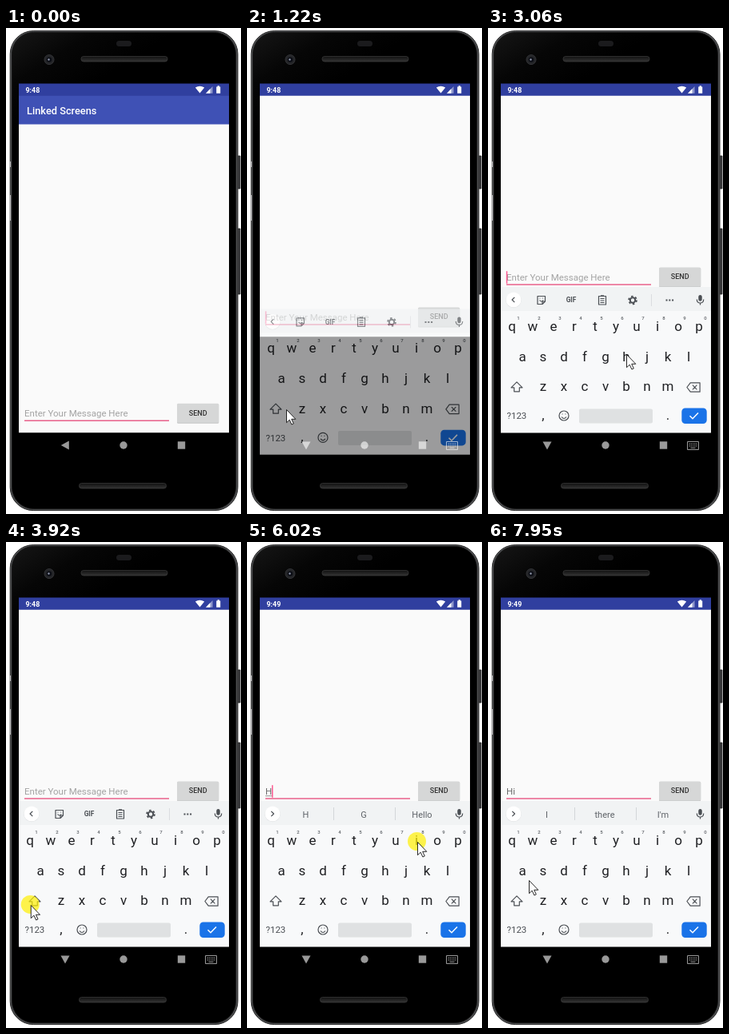
Write an HTML page that moves like this. It is 294 by 608 pixels and loops after 8000 ms.

```html
<!DOCTYPE html>
<html lang="en">
<head>
<meta charset="utf-8">
<title>Message entry on a phone</title>
<style>
  html, body { margin: 0; width: 100%; height: 100%; overflow: hidden; background: #fff; }
  svg { display: block; width: 100vw; height: 100vh; }
  text { font-family: Roboto, sans-serif; white-space: pre; }
  .mid { text-anchor: middle; }
  .key { font-size: 17px; fill: #202124; }
  .digit { font-size: 6px; font-weight: 500; fill: #5f6368; }
  .word { font-size: 11px; fill: #5f6368; }
  .line { fill: none; stroke: #4b4f54; stroke-width: 1.2; stroke-linejoin: round; }
  .solid { fill: #4b4f54; }
  .nav { fill: #fff; opacity: .6; }
</style>
</head>
<body>
<svg viewBox="0 0 294 608">
  <defs>
    <linearGradient id="shell" x1="0" y1="0" x2=".3" y2="1">
      <stop offset="0" stop-color="#161616"/><stop offset=".1" stop-color="#060606"/>
      <stop offset=".2" stop-color="#000"/><stop offset="1" stop-color="#000"/>
    </linearGradient>
    <linearGradient id="slot" x1="0" y1="0" x2="0" y2="1">
      <stop offset="0" stop-color="#111"/><stop offset="1" stop-color="#333"/>
    </linearGradient>
    <clipPath id="window"><path d="M16 84h263v422.400h-263z"/></clipPath>
    <clipPath id="screen"><path d="M16 84h263v451h-263z"/></clipPath>
  </defs>

  <g id="phone">
    <path d="M289 160h4v41h-4zM289 251h4v82h-4z" fill="#3c3d3f" stroke="#222" stroke-width=".8"/>
    <rect x="5.200" y="3.600" width="284.800" height="600" rx="29" fill="#4c4d4f" stroke="#2a2a2a"/>
    <rect x="7.500" y="5.500" width="280" height="596" rx="27" fill="url(#shell)" stroke="#161616"/>
    <path d="M4 167h2v7h-2zM4 209h2v32h-2z" fill="#bbb"/>
    <rect x="138" y="16" width="19" height="7" rx="3.500" fill="#1b1b1d"/>
    <circle cx="54" cy="39.600" r="6" fill="#242528" stroke="#333437"/>
    <circle cx="54" cy="39.600" r="3.200" fill="#0b0d14"/>
    <circle cx="53.500" cy="39.500" r="1.200" fill="#8f96aa"/>
    <rect x="94" y="35.500" width="108" height="6.500" rx="3" fill="url(#slot)" stroke="#383838" stroke-width=".8"/>
    <rect x="91.500" y="569.500" width="109" height="6.500" rx="3" fill="url(#slot)" stroke="#383838" stroke-width=".8"/>
    <path d="M16 69.400h263v465.600h-263z" fill="#000"/>
  </g>

  <g clip-path="url(#window)">
    <g id="content">
      <path d="M16 84h263v422.400h-263z" fill="#fafafa"/>
      <path d="M16 84h263v36.600h-263z" fill="#3f51b5"/>
      <text x="26" y="107.500" font-size="12.800" font-weight="500" fill="#fff">Linked Screens</text>
      <text id="hint" x="23" y="486" font-size="11.500" fill="#a3a3a3">Enter Your Message Here</text>
      <text id="typed" x="23" y="486" font-size="11.500" fill="#6b6b6b"></text>
      <path id="composing" stroke="#777" stroke-width=".8"/>
      <path d="M23 491.300h181" stroke="#e8608a" stroke-width="1.500"/>
      <rect id="caret" y="474.500" width="1.500" height="15.500" fill="#ff4081" opacity=".85"/>
      <rect x="214" y="470.300" width="52.200" height="24.500" rx="1.500" fill="#c4c5c5"/>
      <rect x="214" y="469.800" width="52.200" height="24" rx="1.500" fill="#d6d7d7"/>
      <text class="mid" x="240.200" y="484.700" font-size="9" font-weight="500" fill="#333">SEND</text>
    </g>
  </g>

  <path d="M16 69.400h263v15.350h-263z" fill="#303f9f"/>
  <text id="clock" x="24.500" y="80.500" font-size="8.900" font-weight="700" fill="#fff">9:48</text>
  <path d="M236.800 74.600q5.700-3.600 11.400 0l-5.700 7zM263.200 73.500h1.400v-1.300h2.200v1.300h1.400v8.300h-5z" fill="#fff"/>
  <path d="M250 81.800l8.500-8.800v8.800z" fill="#8f98cc"/>
  <path d="M250 81.800l5.500-5.700v5.700z" fill="#fff"/>

  <g clip-path="url(#screen)">
    <g id="keyboard">
      <path d="M16 324h263v31h-263z" fill="#f1f3f4"/>
      <path d="M16 354h263v152.400h-263z" fill="#f8f9fa"/>
      <circle cx="32" cy="340.500" r="9.700" fill="#dcdee0"/>
      <circle cx="32" cy="340" r="9.500" fill="#fff"/>
      <path id="chevron" class="line"/>
      <g id="tools">
        <path class="line" d="M62 335.500h9.500v6.500l-3.500 3.500h-6zM71.500 342h-3.500v3.500M64.500 340.500q2.300 3 4.600 0M64.500 338h.8M68.200 338h.8"/>
        <text class="mid solid" x="104" y="343.200" font-size="8.300" font-weight="700">GIF</text>
        <path class="line" d="M138.500 335.500h9v10.500h-9zM141 334.800h4M140.500 338.500h5M140.500 341h5M140.500 343.500h5"/>
        <circle class="line" cx="181" cy="340.500" r="3.200" style="stroke-width:2"/>
        <circle class="line" cx="181" cy="340.500" r="4.900" stroke-dasharray="2.500 2.630" style="stroke-width:1.800"/>
        <path d="M204.500 333v15" stroke="#dadce0"/>
        <path class="solid" d="M222.500 339.500h2v2h-2zM226.300 339.500h2v2h-2zM230.100 339.500h2v2h-2z"/>
      </g>
      <g id="suggestions">
        <path d="M108.500 332v16M185.500 332v16" stroke="#d3d6d9"/>
        <text class="word mid" x="73.500" y="344.500"></text>
        <text class="word mid" x="146" y="344.500"></text>
        <text class="word mid" x="219" y="344.500"></text>
      </g>
      <rect class="solid" x="263.300" y="334" width="4.400" height="7.800" rx="2.200"/>
      <path class="line" d="M261.300 339.500q0 4.500 4.200 4.500t4.200-4.500M265.500 344v2.500"/>
      <g id="lower"></g>
      <g id="upper"></g>
      <g id="digits"></g>
      <path id="shift" class="line" d="M36 442.800l7 7h-3.700v5h-6.600v-5h-3.700z"/>
      <path class="line" d="M248.900 449.500l4.300-5.700h11.900v11.400h-11.900zM255.900 446.700l5.500 5.600M261.400 446.700l-5.500 5.600"/>
      <text x="23.500" y="489.200" font-size="11.500" fill="#4b4f54">?123</text>
      <text class="key mid" x="69" y="490">,</text>
      <text class="key mid" x="225" y="490">.</text>
      <circle class="line" cx="95" cy="485" r="6"/>
      <path class="line" d="M92 486.500q3 4 6 0M92.600 483h1M96.400 483h1"/>
      <rect x="114" y="476.500" width="92" height="18" rx="2" fill="#dfe1e2"/>
      <rect x="242.300" y="475.400" width="31.400" height="19.600" rx="4.500" fill="#1a73e8"/>
      <path d="M252.500 485.300l3.500 3.500 7-7.300" fill="none" stroke="#fff" stroke-width="1.500"/>
    </g>
  </g>

  <path id="back" class="nav"/>
  <circle class="nav" cx="147" cy="522" r="4.700"/>
  <path class="nav" d="M214.800 517.300h9.400v9.400h-9.400z"/>
  <g id="switcher" opacity=".6" fill="none" stroke="#fff">
    <path d="M249.500 517.500h14v10h-14z"/>
    <path d="M251.500 520.300h10M251.500 522.800h10" stroke-width="1.300" stroke-dasharray="1.300 .900"/>
    <path d="M253.500 525.300h6"/>
  </g>

  <circle id="click" r="11.500" fill="#fff000" opacity=".7"/>
  <path id="pointer" d="M.5.500v16.200l3.700-3.500 2.700 5.800 2.400-1.100-2.600-5.600h5.100z" fill="#fff" stroke="#111" stroke-width=".9"/>
</svg>

<script>
const $ = id => document.getElementById(id);
const set = (id, attrs) => Object.entries(attrs).forEach(([k, v]) => $(id).setAttribute(k, v));
const show = (id, on) => { $(id).style.display = on ? "" : "none"; };
const clamp = v => Math.max(0, Math.min(1, v));
const smooth = v => v * v * (3 - 2 * v);
const during = (t, from, to) => t >= from && t < to;

const PERIOD = 8000;
const ROWS = [["qwertyuiop", 30, 379.1], ["asdfghjkl", 43, 416.5], ["zxcvbnm", 69, 454.400]];
const label = (text, x, y, cls) => `<text class="${cls} mid" x="${x}" y="${y}">${text}</text>`;
const letters = change => ROWS.map(([row, x, y]) =>
  [...row].map((c, i) => label(change(c), x + 26 * i, y, "key")).join("")).join("");
$("lower").innerHTML = letters(c => c);
$("upper").innerHTML = letters(c => c.toUpperCase());
$("digits").innerHTML = [..."1234567890"].map((c, i) => label(c, 38 + 26 * i, 365.3, "digit")).join("");

// Pointer stops: time, x, y
const PATH = [
  [190, 171, 571], [750, 49, 477], [1530, 49, 477], [2370, 173, 407], [2450, 173, 408],
  [3170, 173, 408], [3760, 30, 451], [4000, 31, 455], [4690, 177, 413], [5280, 177, 413],
  [5900, 213, 375], [6250, 213, 375], [6900, 217, 490], [7020, 216, 490], [7230, 200, 489],
  [7400, 200, 489], [7790, 55, 432], [7930, 51, 423]
];
const CLICKS = [[890, 1060], [3780, 3930], [4860, 5010], [5940, 6170], [7250, 7400]];
const SHIFT_ON = 3930, TYPE_H = 5010, TYPE_I = 6240, SPACE = 7370;

// Each entry restarts the caret's blinking
const ENTRIES = [
  { at: 250, caret: 22.8 },
  { at: 1060, caret: 22.8 },
  { at: TYPE_H, caret: 31, text: "H", words: ["H", "G", "Hello"], underline: 8 },
  { at: TYPE_I, caret: 34, text: "Hi", words: ["Hi", "His", "Him"], underline: 11 },
  { at: SPACE, caret: 36.5, text: "Hi", words: ["I", "there", "I'm"] }
];

function pointerAt(t) {
  const next = PATH.findIndex(p => p[0] > t);
  if (next < 0) return PATH.at(-1).slice(1);
  const [t0, x0, y0] = PATH[Math.max(0, next - 1)], [t1, x1, y1] = PATH[next];
  const k = smooth(clamp((t - t0) / (t1 - t0)));
  return [x0 + (x1 - x0) * k, y0 + (y1 - y0) * k];
}

function drawField(t) {
  const entry = ENTRIES.findLast(e => t >= e.at);
  const text = entry?.text ?? "", words = entry?.words;
  show("hint", !text);
  $("typed").textContent = text;
  set("composing", { d: entry?.underline ? `M23 488h${entry.underline}` : "" });
  show("caret", entry && Math.floor((t - entry.at) / 500) % 2 === 0);
  if (entry) set("caret", { x: entry.caret });

  show("tools", !words);
  show("suggestions", words);
  set("chevron", { d: words ? "M30.300 336.800l3.200 3.200-3.200 3.200" : "M33.300 336.800l-3.200 3.200 3.200 3.200" });
  if (words) $("suggestions").querySelectorAll("text").forEach((el, i) => { el.textContent = words[i]; });
}

function drawKeyboard(t) {
  const opened = clamp((t - 1096) / 200), upper = during(t, SHIFT_ON, TYPE_H);
  set("content", { transform: `translate(0 ${-170.3 * smooth(clamp((t - 1080) / 220))})` });
  set("keyboard", { opacity: opened, transform: `translate(0 ${73 * (1 - opened)})` });
  show("keyboard", opened > 0);
  show("lower", !upper);
  show("upper", upper);
  $("shift").style.fill = upper ? "#4b4f54" : "none";
  show("switcher", opened > 0);
  set("back", { d: opened > 0 ? "M68.500 517.500h11l-5.500 10z" : "M78.800 516.500v11l-10-5.500z" });
}

function drawPointer(t) {
  const [x, y] = pointerAt(t);
  show("pointer", t >= 210);
  set("pointer", { transform: `translate(${x} ${y})` });
  show("click", CLICKS.some(([from, to]) => during(t, from, to)));
  set("click", { cx: x - .5, cy: y - .5 });
}

function draw(now) {
  const t = now % PERIOD;
  $("clock").textContent = t < 5700 ? "9:48" : "9:49";
  drawField(t);
  drawKeyboard(t);
  drawPointer(t);
  requestAnimationFrame(draw);
}
requestAnimationFrame(draw);
</script>
</body>
</html>
```
